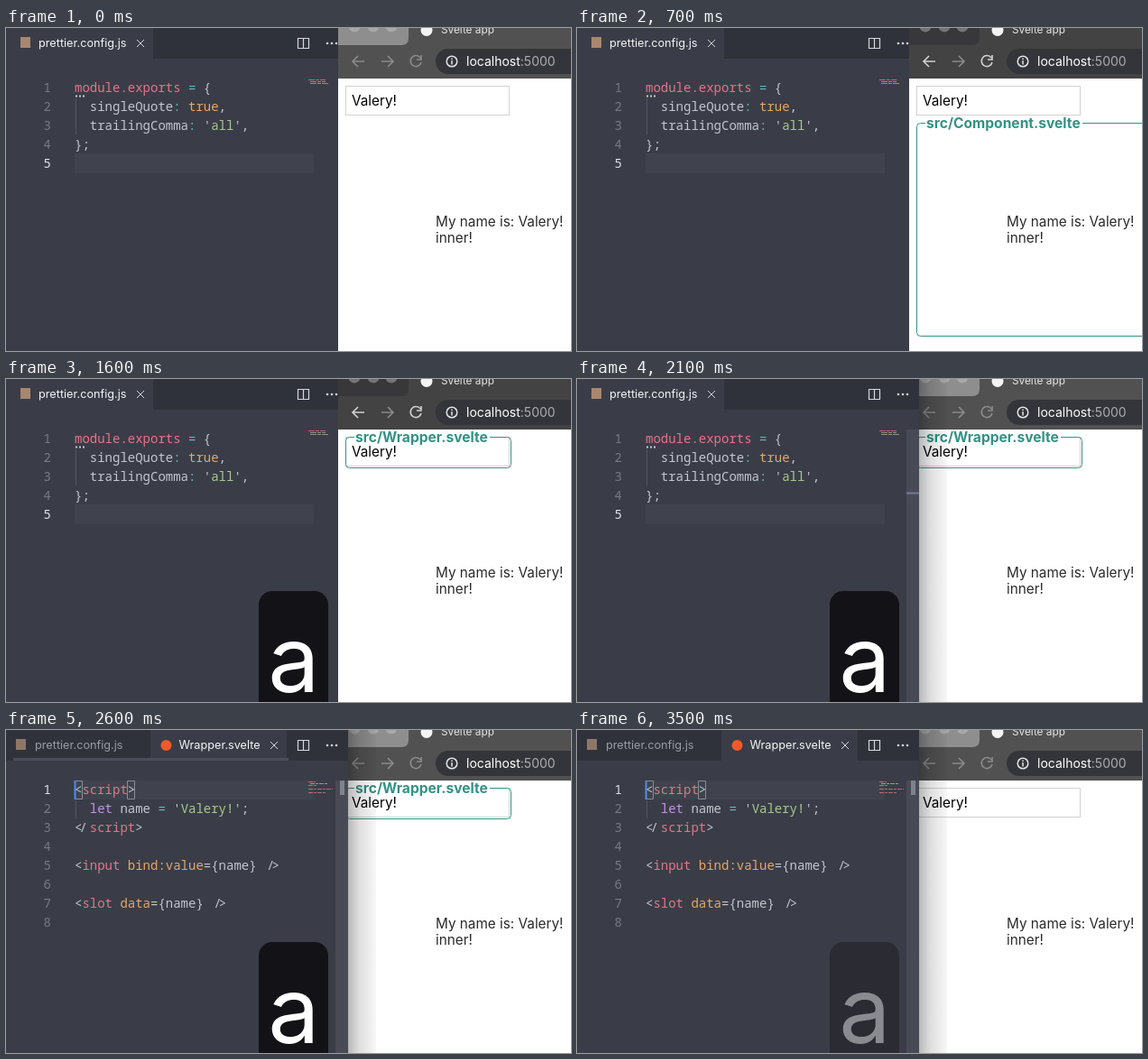
Write an HTML page that moves like this. It is 626 px wide and 358 px high and loops after 3.6 s.

```html
<!DOCTYPE html>
<html lang="en">
<head>
<meta charset="utf-8">
<style>
html, body { margin: 0; height: 100%; overflow: hidden; background: #fff; }
svg { display: block; width: 626px; height: 358px; }
text { font-family: Inter, sans-serif; white-space: pre; }
.code text { font: 14px "Noto Sans Mono", monospace; }
.page { font-size: 15.3px; fill: #2b2b2b; }
.legend { font-size: 15.6px; font-weight: 700; fill: #349184; }
.tab { font-size: 12.7px; fill: #f4f4f6; }
.dim { fill: #989ba3; }
.line { fill: none; stroke: #d5d7db; }
.box { fill: none; stroke: #349184; }
</style>
</head>
<body>
<svg viewBox="0 0 626 358">
  <defs>
    <linearGradient id="shade">
      <stop offset="0" stop-opacity=".28"/>
      <stop offset=".4" stop-opacity=".13"/>
      <stop offset="1" stop-opacity=".03"/>
    </linearGradient>
  </defs>

  <!-- browser -->
  <rect width="626" height="358" fill="#fff"/>
  <rect id="bar" x="368" width="258" height="56"/>
  <path id="frame" d="M368 0H446V11Q446 19 438 19H368Z"/>
  <g id="lights"><circle cx="386" cy="-2" r="6.5"/><circle cx="407" cy="-2" r="6.5"/><circle cx="427" cy="-2" r="6.5"/></g>
  <circle cx="466" cy="2.5" r="6.5" fill="#f4f4f4"/>
  <text x="482" y="5.5" font-size="11.8" fill="#e4e4e4">Svelte app</text>
  <g id="nav" fill="none" stroke-width="1.6">
    <path d="M397 37H384M390 31L384 37L390 43"/>
    <path d="M416 37H429M423 31L429 37L423 43" stroke="#8b8b8b"/>
    <path d="M459 33A6 6 0 1 0 460 38M460 30V35H455"/>
  </g>
  <rect x="476" y="23" width="170" height="28" rx="14" fill="#34353a"/>
  <circle cx="494" cy="37" r="5.8" fill="none" stroke="#e4e5e7" stroke-width="1.5"/>
  <path d="M494 36V40.5M494 33.5V35" stroke="#e4e5e7" stroke-width="1.5"/>
  <text x="510" y="42" font-size="14" fill="#fff">localhost<tspan fill="#abacb0">:5000</tspan></text>

  <rect x="376.5" y="64.5" width="181" height="32" fill="#fff" stroke="#d2d2d2"/>
  <text class="page" x="383" y="86" style="fill:#000">Valery!</text>
  <text class="page" x="476" y="220">My name is: Valery!</text>
  <text class="page" x="476" y="238">inner!</text>

  <g data-on="400 900">
    <path class="box" d="M386 105.5H380.5Q376.5 105.5 376.5 109.5V337.5Q376.5 341.5 380.5 341.5H626M560 105.5H626"/>
    <text class="legend" x="387" y="110.5">src/Component.svelte</text>
  </g>
  <g data-on="900 3000">
    <path d="M386 64.5H536" stroke="#fff" stroke-width="2"/>
    <path class="box" d="M386 64.5H380.5Q376.5 64.5 376.5 68.5V94.5Q376.5 98.5 380.5 98.5H555.5Q559.5 98.5 559.5 94.5V68.5Q559.5 64.5 555.5 64.5H536"/>
    <text class="legend" x="387" y="69.5">src/Wrapper.svelte</text>
  </g>
  <rect data-on="2000 3600" x="379" width="31" height="358" fill="url(#shade)"/>

  <!-- editor -->
  <svg id="editor" height="358">
    <rect width="379" height="358" fill="#3a3d47"/>
    <rect width="379" height="34" fill="#30323b"/>
    <rect data-on="2000 3600" x="365" y="56" width="14" height="302" fill="#484b56"/>
    <g data-on="0 2600">
      <rect width="163" height="34" fill="#3a3d47"/>
      <rect x="16" y="10" width="11" height="12" fill="#a9866f"/>
      <text class="tab" x="36" y="21">prettier.config.js</text>
      <path class="line" d="M145 13L153 21M153 13L145 21"/>
      <rect x="76" y="139" width="265" height="22" fill="#40434d"/>
      <path d="M77.5 78V118" stroke="#53565f"/>
      <path d="M77 75.5H87" stroke="#c8cacf" stroke-width="2" stroke-dasharray="2"/>
      <g class="code" id="config"></g>
      <g stroke-dasharray="7 1 4 1" stroke-width="1.2" opacity=".75">
        <path d="M335 57.5H354" stroke="#e8738a"/>
        <path d="M337 59.5H354M337 61.5H357" stroke="#b9a88c"/>
      </g>
    </g>
    <path data-on="2000 2600" d="M365 126.5H379" stroke="#73799c" stroke-width="2"/>
    <g data-on="2600 3600">
      <rect x="160" width="151" height="34" fill="#3a3d47"/>
      <rect x="11" y="10" width="11" height="12" fill="#8f7766"/>
      <text class="tab dim" x="32" y="21">prettier.config.js</text>
      <circle cx="177.5" cy="17" r="6" fill="#f05a28"/>
      <text class="tab" x="191.5" y="21">Wrapper.svelte</text>
      <path class="line" d="M293 13L301 21M301 13L293 21"/>
      <rect x="76" y="56" width="265" height="21" fill="#40434d"/>
      <path d="M77.5 78V98" stroke="#53565f"/>
      <path d="M76.5 56.5H84.5V76.5H76.5ZM134.5 56.5H142.5V76.5H134.5Z" fill="none" stroke="#8a8d94"/>
      <g class="code" id="wrapper"></g>
      <rect x="75.5" y="56" width="2" height="21" fill="#4b8df8"/>
      <g stroke-dasharray="5 1 3 1" stroke-width="1.2" opacity=".75">
        <path d="M335 57.5H343M335 61.5H344M335 65.5H362M335 69.5H355" stroke="#e8738a"/>
        <path d="M337 59.5H357" stroke="#a9c78d"/>
      </g>
      <rect x="370" y="56" width="5" height="16" fill="#7f828a"/>
    </g>
    <rect data-on="2600 2700" x="8" y="31" width="305" height="3" fill="#4b4e58"/>
    <path class="line" d="M323.5 11.5H335.5V22.5H323.5ZM329.5 11.5V22.5" stroke-width="1.2"/>
    <g fill="#d5d7db"><circle cx="356" cy="17" r="1.3"/><circle cx="361" cy="17" r="1.3"/><circle cx="366" cy="17" r="1.3"/></g>
  </svg>

  <g id="key">
    <rect x="280" y="235" width="77" height="150" rx="15" fill="#131217"/>
    <text x="319" y="347" font-size="102" text-anchor="middle" fill="#fff">a</text>
  </g>
</svg>
<script>
const $ = id => document.getElementById(id);
const colors = { r: '#e8738a', c: '#5fb8c4', w: '#c3c6ce', o: '#e5a768', g: '#a9c78d', p: '#c792ea' };

const spaced = (text, gap) => `<tspan letter-spacing="${gap}">${text}</tspan>`;

// Draws tag brackets close to their slash, like a coding ligature.
const ligate = text => text
  .replace(/</g, '&lt;')
  .replace('&lt;/', spaced('&lt;', -3) + spaced('/', 3))
  .replace(' />', spaced(' ', 3) + spaced('/', -3) + '&gt;');

// Each segment is a colour letter followed by its text.
function writeCode(id, active, lines) {
  $(id).innerHTML = lines.map((line, i) => {
    const y = 71 + 21 * i;
    const spans = line.split('|').filter(Boolean).map(s =>
      `<tspan fill="${colors[s[0]]}">${ligate(s.slice(1))}</tspan>`).join('');
    const shade = i + 1 === active ? '#dfe1e5' : '#767982';
    return `<text x="41.5" y="${y}" fill="${shade}">${i + 1}</text><text x="76" y="${y}">${spans}</text>`;
  }).join('');
}

writeCode('config', 5, [
  'rmodule.exports|c =|w {',
  'w  singleQuote|c:|o true|w,',
  "w  trailingComma|c:|w '|gall|w',",
  'w};',
  ''
]);
writeCode('wrapper', 1, [
  'w<|rscript|w>',
  "p  let|w name|c =|w '|gValery!|w';",
  'w</|rscript|w>',
  '',
  'w<|rinput|o bind:value|w={name} />',
  '',
  'w<|rslot|o data|w={name} />',
  ''
]);

const timed = [...document.querySelectorAll('[data-on]')].map(el => [el, ...el.dataset.on.split(' ').map(Number)]);

function draw(now) {
  const t = now % 3600;
  for (const [el, from, to] of timed) el.style.display = t >= from && t < to ? '' : 'none';

  const focused = t >= 200 && t < 2000;
  $('bar').style.fill = focused ? '#434343' : '#515151';
  $('frame').style.fill = focused ? '#38383a' : '#8e8e8e';
  $('lights').style.fill = focused ? '#747476' : '#a8a8a8';
  $('nav').style.stroke = focused ? '#d2d2d2' : '#8b8b8b';
  $('editor').setAttribute('width', t < 2000 ? 368 : 379);

  const fade = Math.max(0, Math.floor((t - 3200) / 100)) * 0.2;
  $('key').style.opacity = t < 1400 ? 0 : 1 - fade;
  requestAnimationFrame(draw);
}
draw(0);
</script>
</body>
</html>
```
